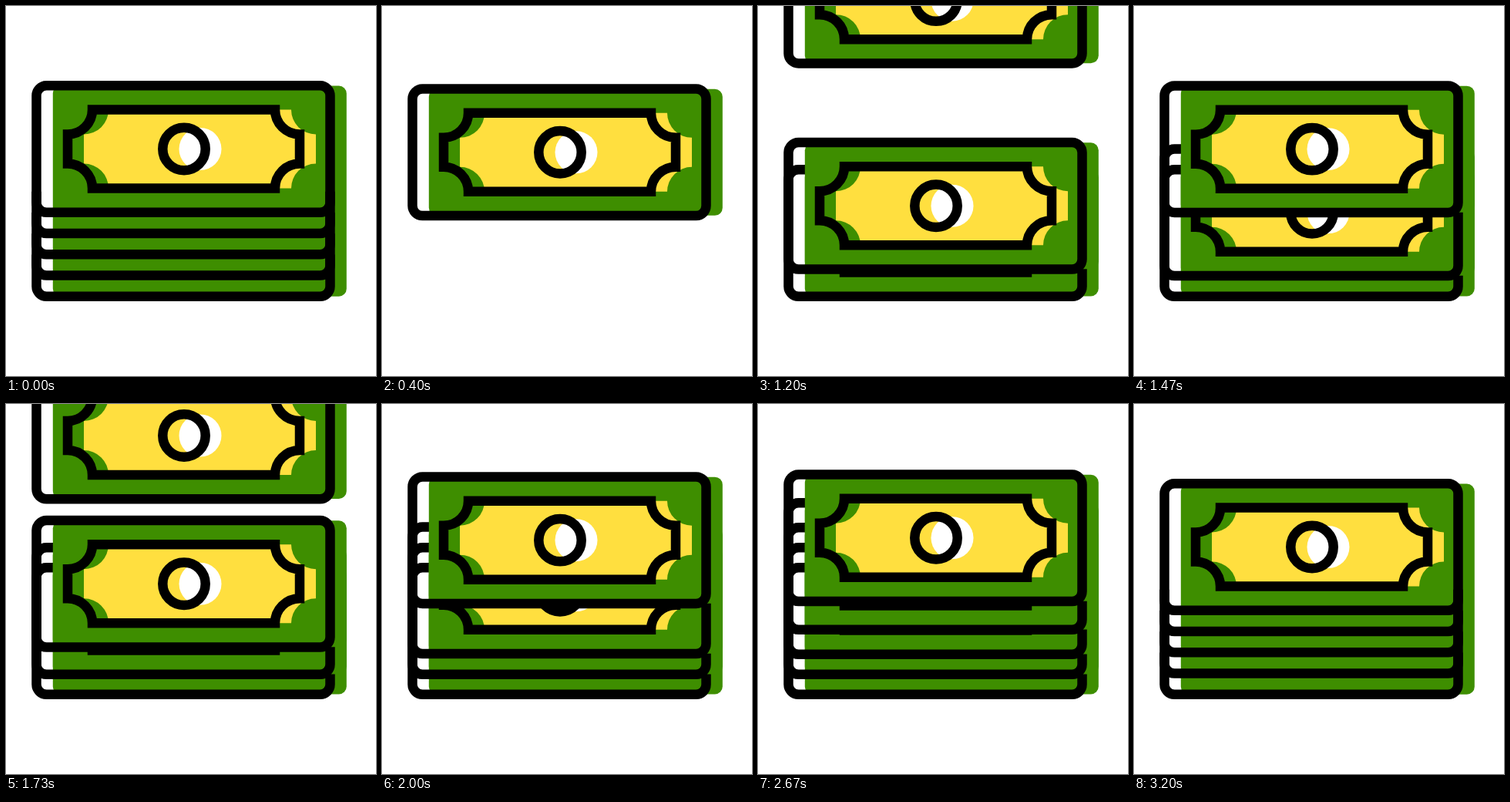
Recreate the animation shown at these times as an HTML page. Size 480 px wide and 480 px high, loop 3270 ms.

```html
<!DOCTYPE html>
<html lang="en">
<head>
<meta charset="utf-8">
<title>Stacking banknotes</title>
<style>
  html, body { margin: 0; width: 100%; height: 100%; overflow: hidden; background: #fff; }
  svg { display: block; width: 100vw; height: 100vh; }
  .line { fill: none; stroke: #000; stroke-width: 12.5; }
  .paper { fill: #3e8e00; }
  .gold { fill: #ffdf3f; }
</style>
</head>
<body>
<svg viewBox="0 0 480 480">
  <defs>
    <path id="frame" d="M112 37.5H349A32 32 0 0 0 381 69.5V107.5A32 32 0 0 0 349 139.5H112A32 32 0 0 0 80 107.5V69.5A32 32 0 0 0 112 37.5Z"/>
    <g id="face">
      <use href="#frame" x="21" class="gold"/>
      <circle cx="252" cy="88.5" r="27.5" fill="#fff"/>
      <use href="#frame" class="line"/>
      <circle cx="231" cy="88.5" r="27.7" class="line"/>
    </g>
    <g id="bill">
      <rect x="60.8" y="6.5" width="381" height="164" rx="10" class="paper"/>
      <use href="#face"/>
      <rect x="39.5" y="6.3" width="381" height="164.5" rx="13" class="line"/>
    </g>
  </defs>
  <g id="bills"></g>
  <g id="stack">
    <rect x="33" y="97" width="394" height="286" rx="19" fill="#fff"/>
    <rect x="60.8" y="103.5" width="381" height="273.3" rx="10" class="paper"/>
    <use href="#face" y="97"/>
    <rect x="39.5" y="103.3" width="381" height="273.5" rx="13" class="line"/>
  </g>
</svg>
<script>
const LOOP = 3270, STEP = 66.7, LAST_STEP = 48;
const SPACING = 27.25;
const drops = [
  { start: 0.5, rest: 206 },
  { start: 7, rest: 180 },
  { start: 15, rest: 154 },
  { start: 21.8, rest: 122 },
  { start: 29.5, rest: 97 }
];

function add(parent, tag, attrs) {
  const node = document.createElementNS("http://www.w3.org/2000/svg", tag);
  for (const key in attrs) node.setAttribute(key, attrs[key]);
  return parent.appendChild(node);
}

const billLayer = document.getElementById("bills");
const stack = document.getElementById("stack");
for (const drop of drops) drop.node = add(billLayer, "use", { href: "#bill" });

// Bottom edges of the notes in the finished stack
for (let i = 0; i < 4; i++) {
  const y = 267.8 + i * SPACING;
  add(stack, "path", {
    class: "line",
    d: `M39.5 ${y - 27}V${y - 13}a13 13 0 0 0 13 13H407.5a13 13 0 0 0 13 -13V${y - 27}`
  });
}

const clamp01 = v => Math.max(0, Math.min(1, v));

// Height above the resting place, with a long soft landing
const heightLeft = u => Math.max(0, 745 / (1 + Math.exp(0.45 * (u - 1.5))) - 1);

function draw(ms) {
  const step = Math.min(LAST_STEP, Math.floor((ms % LOOP + 5) / STEP));
  for (const { node, start, rest } of drops) {
    node.setAttribute("y", (rest - heightLeft(step - start)).toFixed(2));
  }
  const closed = step === 0 ? 1 : clamp01((step - 43) / 4);
  stack.setAttribute("opacity", closed);
  billLayer.setAttribute("visibility", closed === 1 ? "hidden" : "visible");
}

const begin = performance.now();
function tick() {
  draw(performance.now() - begin);
  requestAnimationFrame(tick);
}
draw(0);
requestAnimationFrame(tick);
</script>
</body>
</html>
```
